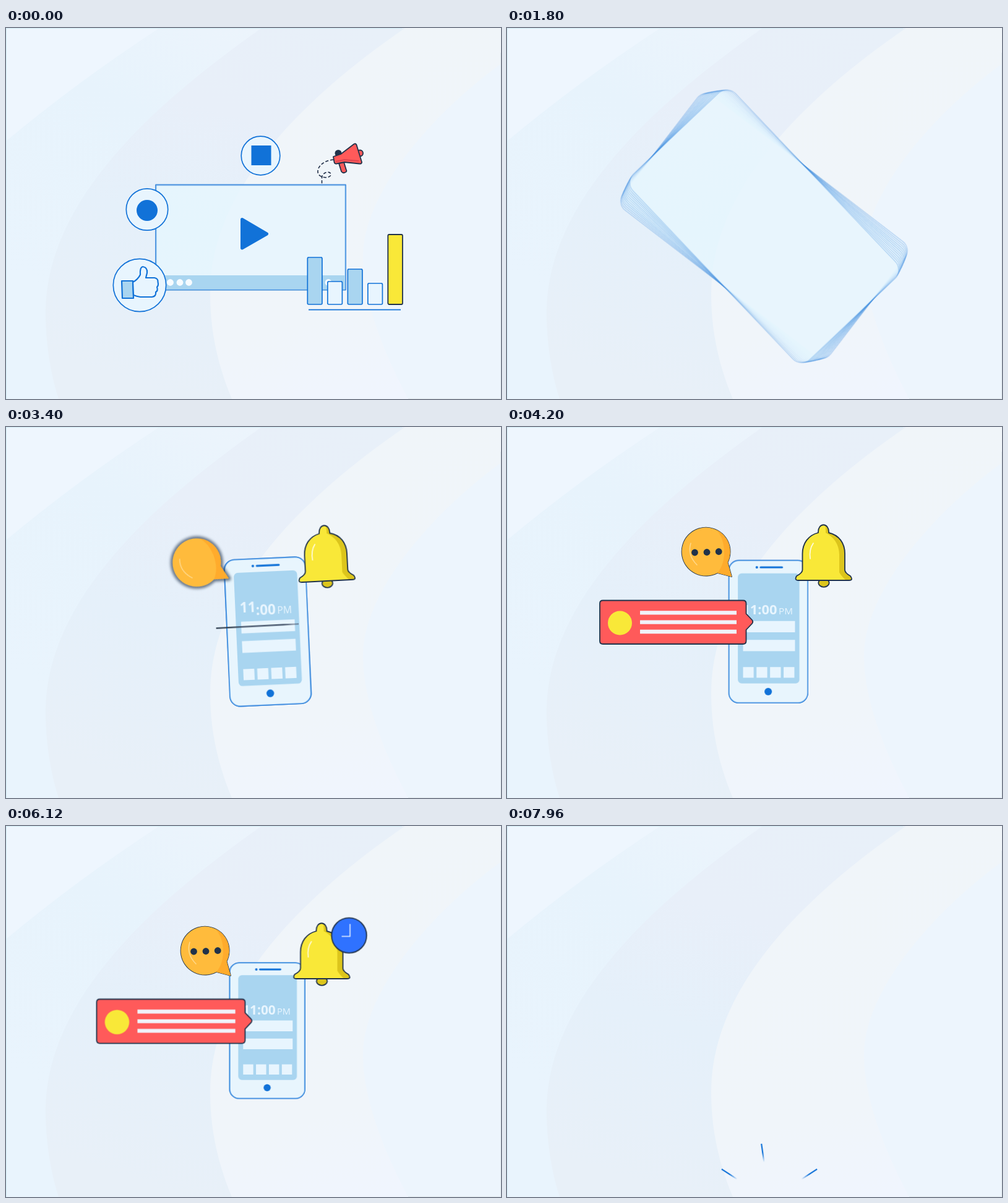
These frames come from a looping animation (800 px wide and 600 px high, 8 s). An HTML page:

```html
<!DOCTYPE html>
<html lang="en">
<head>
<meta charset="utf-8">
<title>From video to phone</title>
<style>
  html, body { margin: 0; width: 100%; height: 100%; overflow: hidden; background: #edf5fd; }
  svg { display: block; width: 100vw; height: 100vh; }

  :root { --blue: #1172d8; --mid: #a9d5f0; --pale: #e8f5fe; --ink: #20324a; --yellow: #f9e838; --red: #ff5a5a; }
  .blue { fill: var(--blue); }
  .mid { fill: var(--mid); }
  .pale { fill: var(--pale); }
  .ink { fill: var(--ink); }
  .yellow { fill: var(--yellow); }
  .red { fill: var(--red); }
  .line { stroke: var(--blue); stroke-width: 1.7; }
  .edge { stroke: var(--ink); stroke-width: 1.8; stroke-linejoin: round; }
  .none { fill: none; }
  .fixed { vector-effect: non-scaling-stroke; }
  .anim { animation: 8s linear infinite; transform-origin: var(--o, 0 0); }

  /* The panel that spins into a phone */
  .spin { animation-name: spin; }
  .ghost { animation-name: spin, corners; fill: var(--pale); fill-opacity: .25; stroke: var(--blue); stroke-opacity: .25; stroke-width: 1.4; }
  @keyframes spin {
    0% { transform: translate(395.5px, 338.5px) rotate(0deg) scale(1); }
    13% { transform: translate(395.5px, 338.5px) rotate(0deg) scale(1.036); }
    15.5% { transform: translate(395.5px, 338.5px) rotate(0deg) scale(1.04); animation-timing-function: ease-in; }
    20.9% { transform: translate(404px, 303px) rotate(13deg) scale(1.57); }
    22% { transform: translate(415px, 319.5px) rotate(28deg) scale(1.42); }
    30.5% { transform: translate(421.5px, 330px) rotate(188deg) scale(.835); }
    33.75% { transform: translate(422px, 331px) rotate(243deg) scale(.8); }
    36.5% { transform: translate(422.5px, 331px) rotate(260deg) scale(.785); }
    42.5% { transform: translate(423px, 331px) rotate(267.2deg) scale(.775); }
    46% { transform: translate(422.5px, 331px) rotate(270deg) scale(.762); }
    62.5% { transform: translate(422.3px, 331px) rotate(270deg) scale(.737); }
    76.5% { transform: translate(422.3px, 331px) rotate(270deg) scale(.716); }
    88.5% { transform: translate(422.3px, 331px) rotate(270deg) scale(.708); animation-timing-function: cubic-bezier(.33, .67, .67, 1); }
    92.7% { transform: translate(422.3px, 115px) rotate(270deg) scale(.708); animation-timing-function: cubic-bezier(.33, 0, .67, .33); }
    97.7%, 100% { transform: translate(422.3px, 764px) rotate(270deg) scale(.708); }
  }
  @keyframes corners { 0%, 16% { rx: 0; } 26%, 100% { rx: 21px; } }

  /* Video scene */
  .leave { animation-name: leave; }
  @keyframes leave {
    0%, 13% { transform: scale(1); }
    14.5% { transform: scale(1.12); animation-timing-function: ease-in; }
    17%, 100% { transform: scale(0); }
  }
  .thumb-badge { animation-name: badge; }
  @keyframes badge {
    0% { transform: scale(1); }
    9% { transform: scale(1.01); }
    13% { transform: scale(1.07); }
    14.5% { transform: scale(1.15); animation-timing-function: ease-in; }
    17%, 100% { transform: scale(0); }
  }
  .hand { animation-name: hand; }
  @keyframes hand { 0% { transform: scale(1); } 13%, 100% { transform: scale(1.13); } }
  .strip { animation-name: strip; }
  @keyframes strip {
    0% { transform: scale(1); }
    13% { transform: scale(1.036, 1.12); animation-timing-function: ease-in; }
    16%, 100% { transform: scale(0, 1.12); }
  }
  .horn { animation-name: horn; }
  @keyframes horn {
    0% { transform: none; }
    6.5% { transform: rotate(-4deg) scale(1.03); }
    13% { transform: translate(-1px, 0) rotate(-.5deg); }
    14.5% { transform: rotate(-6deg) scale(1.12); }
    17%, 100% { transform: scale(0); }
  }
  .specks { animation-name: specks; }
  @keyframes specks {
    0%, 8% { opacity: 0; transform: translate(-8px, 3px); }
    10%, 13% { opacity: 1; transform: none; }
    15%, 100% { opacity: 0; transform: translate(5px, -2px); }
  }
  .trail { animation-name: trail; }
  @keyframes trail { 0%, 14% { opacity: 1; } 16%, 100% { opacity: 0; } }
  .chart { animation-name: chart; }
  @keyframes chart { 0%, 17% { visibility: visible; } 17.1%, 100% { visibility: hidden; } }
  .bar { animation-name: bar; }
  @keyframes bar {
    0% { height: var(--a); animation-timing-function: ease-in-out; }
    13% { height: var(--b); animation-timing-function: ease-in; }
    17%, 100% { height: 0; }
  }
  .ground { animation-name: ground; }
  @keyframes ground {
    0% { transform: scaleX(1); }
    13% { transform: scaleX(1.08); animation-timing-function: ease-in; }
    17%, 100% { transform: scaleX(0); }
  }

  /* Phone scene */
  .screen { animation-name: screen; }
  @keyframes screen {
    0%, 33.5% { transform: scale(0); animation-timing-function: ease-out; }
    38%, 100% { transform: scale(1); }
  }
  .hours { animation-name: hours; }
  .minutes { animation-name: minutes; }
  @keyframes hours { 0%, 39% { transform: translateY(9px); opacity: 0; } 41%, 42.5% { transform: translateY(-4px); opacity: 1; } 45%, 100% { transform: none; } }
  @keyframes minutes { 0%, 40% { transform: translateY(9px); opacity: 0; } 42.5% { transform: translateY(1px); opacity: 1; } 44% { transform: translateY(-4px); } 46.5%, 100% { transform: none; } }
  .clock-text { font-family: "Open Sans", "Noto Sans", sans-serif; }

  .card { animation-name: card; }
  @keyframes card {
    0%, 42.2% { opacity: 0; transform: translate(68px, 4px) rotate(-3deg) scale(.48, .001); }
    42.4%, 42.5% { opacity: 1; transform: translate(68px, 4px) rotate(-3deg) scale(.5, .001); animation-timing-function: ease-out; }
    47% { transform: translate(0, 0) rotate(0deg) scale(1.12, 1.06); animation-timing-function: ease-in-out; }
    50%, 62.5% { transform: translate(0, 0) rotate(0deg) scale(1); }
    76.5% { transform: translate(0, 0) rotate(0deg) scale(1.014, 1.012); }
    80.5% { transform: translate(0, 0) rotate(0deg) scale(1.06); animation-timing-function: ease-in; }
    84%, 100% { transform: translate(0, 0) rotate(0deg) scale(0); }
  }
  .bubble { animation-name: bubble; }
  @keyframes bubble {
    0%, 40% { transform: scale(0) rotate(-50deg); }
    42% { transform: translate(-3px, 3px) rotate(-26deg) scale(.9); }
    42.5% { transform: translate(-3px, 3px) rotate(-18deg) scale(1); animation-timing-function: ease-out; }
    45% { transform: rotate(7deg) scale(1.05); animation-timing-function: ease-in-out; }
    48.5%, 84% { transform: none; }
    86.5% { transform: scale(1.18); animation-timing-function: ease-in; }
    89%, 100% { transform: scale(0); }
  }
  .rim { animation-name: rim; }
  @keyframes rim {
    0%, 42.5% { filter: blur(2.4px); stroke-width: 7px; stroke-opacity: .65; }
    44%, 100% { filter: blur(0); stroke-width: 1.8px; stroke-opacity: 1; }
  }
  .dots { animation-name: dots; }
  @keyframes dots { 0%, 45% { transform: scale(0); } 48% { transform: scale(1.15); } 50%, 100% { transform: scale(1); } }
  .bell { animation-name: bell; }
  @keyframes bell {
    0%, 37.5% { transform: translate(5px, 1px) rotate(-12deg) scale(0); animation-timing-function: ease-out; }
    40% { transform: translate(5px, 1px) rotate(-5deg) scale(1.2); }
    42.5% { transform: translate(5px, 1px) rotate(-3deg) scale(1); }
    46% { transform: translate(1px, 0) rotate(2deg) scale(1); }
    50%, 62.5% { transform: none; }
    76.5%, 84.5% { transform: translate(-1.5px, -1px); }
    86% { transform: translate(-1.5px, -1px) scale(1.1); animation-timing-function: ease-in; }
    89%, 100% { transform: scale(0); }
  }
  .clock { animation-name: clock; }
  @keyframes clock {
    0%, 53.5% { transform: translate(58px, -27px) scale(0); animation-timing-function: ease-out; }
    56% { transform: translate(58px, -27px) scale(1); animation-timing-function: ease-in-out; }
    60%, 62.5% { transform: none; }
    76.5%, 84.5% { transform: translate(1.5px, -1.5px); }
    87% { transform: translate(62px, -27px) scale(1); animation-timing-function: ease-in; }
    89.5%, 100% { transform: translate(62px, -27px) scale(0); }
  }
  .ray { animation-name: ray; }
  @keyframes ray {
    0%, 97.9% { opacity: 0; transform: translateY(45px); animation-timing-function: ease-out; }
    98% { opacity: 1; transform: translateY(40px); }
    99.5%, 100% { opacity: 1; transform: none; }
  }
</style>
</head>
<body>
<svg viewBox="0 0 800 600" preserveAspectRatio="none">
  <defs>
    <linearGradient id="band1" x1=".8" y1="0" x2=".2" y2=".8">
      <stop offset="0" stop-color="#eff5fc"/><stop offset=".5" stop-color="#e7f3fc"/><stop offset="1" stop-color="#e9f4fd"/>
    </linearGradient>
    <linearGradient id="band2" x1=".7" y1="0" x2=".3" y2="1">
      <stop offset="0" stop-color="#e8f0f9"/><stop offset=".3" stop-color="#e8eff9"/><stop offset=".6" stop-color="#e5f0fa"/><stop offset="1" stop-color="#e8f0f8"/>
    </linearGradient>
    <linearGradient id="band3" x1=".4" y1="0" x2=".6" y2="1">
      <stop offset="0" stop-color="#f0f5f9"/><stop offset=".75" stop-color="#f0f5fa"/><stop offset="1" stop-color="#f0f5fe"/>
    </linearGradient>
    <linearGradient id="fade" gradientUnits="userSpaceOnUse" x1="0" y1="-92" x2="0" y2="-62">
      <stop offset=".5" stop-color="#1172d8"/><stop offset="1" stop-color="#1172d8" stop-opacity="0"/>
    </linearGradient>
    <clipPath id="bellClip"><path d="M503 171C502 154 521 154 520 171C537 175 546 188 546 205V231Q546 236 555 241Q560 248 553 248H471Q464 248 468 241Q477.500 236 477.500 231V205C477.500 188 487 175 503 171Z"/></clipPath>
  </defs>

  <path fill="#eef6fe" d="M0 0H800V600H0Z"/>
  <path fill="url(#band1)" d="M248 0Q115 87 0 183V600H800V0Z"/>
  <path fill="url(#band2)" d="M413 0C280 95 64 260 64 460C64 510 72 560 85 600H800V0Z"/>
  <path fill="url(#band3)" d="M645 0C500 100 330 250 330 430C330 490 342 545 365 600H800V0Z"/>
  <path fill="#edf5fd" d="M800 58C700 130 577 260 577 370C577 440 608 520 650 600H800Z"/>
  <path class="none" stroke="#d3edf6" d="M.5 600V.5H640"/>
  <path class="none" stroke="#e2e9ef" d="M799.500 40V599.500H650"/>

  <path class="anim trail none" stroke="#1d2b45" stroke-width="1.6" stroke-dasharray="5 3" d="M529 213C514 214 503 224 504 233C505 243 522 244 525 238C526 231 513 231 510.500 241V256"/>

  <g id="panel"></g>

  <!-- Video scene -->
  <rect class="anim strip mid" style="--o:395.5px 400px" x="243.300" y="400" width="304.400" height="22.500"/>
  <g class="anim leave" style="--o:395.5px 411.5px" fill="#f6fbff">
    <circle cx="265.500" cy="411.500" r="5.400"/><circle cx="281" cy="411.500" r="5.400"/>
    <circle cx="295.500" cy="411.500" r="5.400"/><circle cx="521" cy="411.500" r="5.400"/>
  </g>
  <path class="anim leave blue" style="--o:400px 333px" stroke="#1172d8" stroke-width="5" stroke-linejoin="round" d="M381.500 309.500L421.500 333L381.500 356Z"/>

  <g class="anim leave" style="--o:411.5px 206.5px">
    <circle class="pale line" cx="411.500" cy="206.500" r="31.300"/>
    <rect class="blue" x="396.500" y="190" width="32" height="32"/>
  </g>
  <g class="anim leave" style="--o:228px 293.5px">
    <circle class="pale line" cx="228" cy="293.500" r="33.700"/>
    <circle class="blue" cx="228" cy="295" r="17"/>
  </g>
  <g class="anim thumb-badge" style="--o:216px 416px">
    <circle class="pale line" cx="216" cy="416" r="42.700"/>
    <g class="anim hand" style="--o:216px 416px" stroke="#1172d8" stroke-width="2.200" stroke-linejoin="round">
      <path class="mid" d="M187 409H205L206 437H188Z"/>
      <path class="pale" d="M205 411Q213 407 217 399Q216 387 221 386Q229 387 228 396L226 404H240Q246 405 245.500 411Q247 416 244 419Q246 425 242 427Q243 434 236 435H217Q211 434 206 432Z"/>
    </g>
  </g>

  <g class="anim horn edge" style="--o:540px 215px">
    <circle class="ink" cx="537" cy="202.500" r="4.600"/>
    <circle class="red" cx="572" cy="202.500" r="5"/>
    <path class="red" d="M538 219L542 232Q545 236 549 233Q551 232 550 230L546 217Z"/>
    <path class="red" d="M529 208L541 204L562 188Q565 186 566.500 189L575 217Q575 220 571 219.500L547 217L534 219.500Q531 220 530.500 217Z"/>
    <path class="none" stroke="#e04450" stroke-width="2" d="M533 216L547 213L570 215"/>
  </g>
  <g class="anim specks ink">
    <circle cx="579" cy="186.500" r=".9"/><circle cx="588.500" cy="197.500" r=".9"/><circle cx="586" cy="212" r=".9"/>
  </g>

  <g class="anim chart">
    <g id="bars" transform="matrix(1 0 0 -1 0 447)"></g>
    <path class="anim ground line" style="--o:563.5px 456px" d="M489 455.700H638"/>
  </g>

  <!-- Phone scene -->
  <g class="anim spin" style="animation-delay:-20ms">
    <g transform="rotate(90) scale(1.357) translate(-422.300 -331)">
      <g class="anim screen" style="--o:422.3px 331px">
        <rect class="mid" x="374" y="238.500" width="97.500" height="174.500" rx="6"/>
        <circle class="blue" cx="404" cy="229" r="2"/>
        <path class="line" style="stroke-width:3" stroke-linecap="round" d="M410 229H444"/>
        <circle class="blue" cx="422" cy="426" r="5.900"/>
        <g class="clock-text pale">
          <text class="anim hours" x="381" y="304" font-size="21.500" font-weight="700">11</text>
          <text class="anim minutes" x="405.500" y="304" font-size="21.500" font-weight="700">:00</text>
          <text x="438.500" y="304" font-size="15">PM</text>
        </g>
        <path class="pale" d="M382 314h82.500v18h-82.500zM382 344h82.500v18h-82.500zM382 387h17v17h-17zM403.500 387h17v17h-17zM425 387h17v17h-17zM446.500 387h17v17h-17z"/>
      </g>
    </g>
  </g>

  <g class="anim card" style="--o:397px 315px">
    <path class="red edge fixed" d="M155 280.500H381.500Q386.500 280.500 386.500 285.500V302L396 312Q398.500 315 396 318L386.500 328V346Q386.500 351 381.500 351H155Q150 351 150 346V285.500Q150 280.500 155 280.500Z"/>
    <circle class="yellow" cx="182.500" cy="317" r="19.500"/>
    <path stroke="#f1f2fa" stroke-width="6.300" d="M215 300.300H371M215 315.700H371M215 331H371"/>
  </g>

  <g class="anim bubble" style="--o:363px 242px">
    <path class="anim rim none edge" d="M340 236A39 39 0 1 1 356.500 219L363 242Z"/>
    <path fill="#ffbb3c" d="M340 236A39 39 0 1 1 356.500 219L363 242Z"/>
    <path fill="#ffab2c" d="M338 166A39 39 0 0 1 356.500 219L363 242L340 236Q352 222 351 198Q349 177 338 166Z"/>
    <path class="none" stroke="#ffd98c" stroke-width="1.500" stroke-linecap="round" d="M297 188Q291 207 307 223"/>
    <g class="anim dots ink" style="--o:323px 202px">
      <circle cx="303.500" cy="203" r="5.400"/><circle cx="323" cy="202.500" r="5.400"/><circle cx="342.200" cy="201.500" r="5.400"/>
    </g>
  </g>

  <g class="anim bell" style="--o:512px 205px">
    <ellipse class="edge" fill="#dcc51c" cx="512" cy="252" rx="8.700" ry="6.800"/>
    <g clip-path="url(#bellClip)">
      <path class="yellow" d="M460 150H565V255H460Z"/>
      <path fill="#dcc51c" d="M511 155Q516 160 515 171Q536 182 537 206V235Q540 241 548 248H562V150Z"/>
    </g>
    <path class="none edge" d="M503 171C502 154 521 154 520 171C537 175 546 188 546 205V231Q546 236 555 241Q560 248 553 248H471Q464 248 468 241Q477.500 236 477.500 231V205C477.500 188 487 175 503 171Z"/>
    <path class="none" stroke="#fffbe0" stroke-width="1.700" stroke-linecap="round" d="M495 188Q488 198 490 213"/>
  </g>
  <g class="anim clock" style="--o:553px 178.500px">
    <circle class="edge" fill="#2f72ff" cx="553" cy="178.500" r="28.300"/>
    <path class="none" stroke="#eaf3ff" stroke-width="1.600" d="M541 180H554.500V160"/>
  </g>

  <g id="rays" transform="translate(424 605)"></g>
</svg>
<script>
  const add = (parent, tag, attrs) => {
    const el = document.createElementNS('http://www.w3.org/2000/svg', tag);
    for (const key in attrs) el.setAttribute(key, attrs[key]);
    return parent.appendChild(el);
  };
  const byId = id => document.getElementById(id);

  // Translucent copies, a few milliseconds apart, give the panel its motion blur.
  for (let i = 0; i < 12; i++) {
    add(byId('panel'), 'rect', {
      class: 'anim ghost fixed', x: -153, y: -84.5, width: 306, height: 169,
      style: `animation-delay:${-i * 3.4}ms`
    });
  }

  const bars = [[76, 61, 'mid line'], [37, 67, 'pale line'], [57, 67, 'mid line'], [34, 73, 'pale line'], [113, 127, 'yellow edge']];
  bars.forEach(([from, to, look], i) => add(byId('bars'), 'rect', {
    class: `anim bar ${look}`, x: 487.3 + i * 32.5, y: 0, width: 23.6, rx: 2,
    style: `--a:${from}px;--b:${to}px`
  }));

  for (const angle of [-57, -8, 57]) {
    const arm = add(byId('rays'), 'g', { transform: `rotate(${angle})` });
    add(arm, 'path', { class: 'anim ray', stroke: 'url(#fade)', 'stroke-width': 2.2, d: 'M0 -92V-62' });
  }
</script>
</body>
</html>
```
